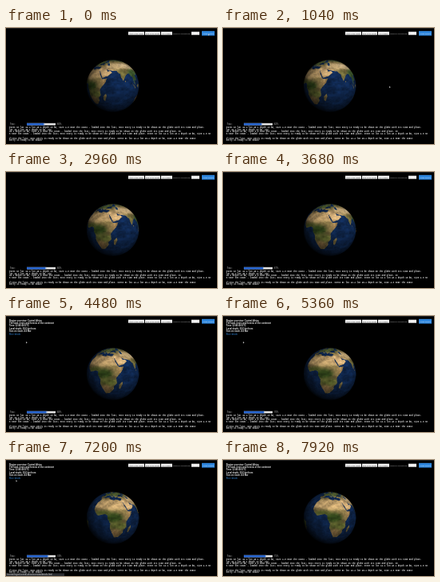
An HTML page with a canvas that plays this animation: 264x146 px, repeating every 8 s.

```html
<!DOCTYPE html>
<html lang="en">
<head>
<meta charset="utf-8">
<title>Rotating globe</title>
<style>
html, body { margin: 0; width: 100%; height: 100%; overflow: hidden; background: #000; }
canvas { display: block; width: 264px; height: 146px; }
</style>
</head>
<body>
<canvas id="stage" width="264" height="146"></canvas>
<script>
const LOOP = 8000, STEP = 80;
const MAP_W = 720, MAP_H = 360;
const GLOBE = { x: 133.5, y: 73, radius: 33, distance: 3, size: 132 };
const SANS = '"Liberation Sans", Arial, sans-serif';
const MONO = '"Liberation Mono", monospace';
const stage = document.getElementById('stage');
const ctx = stage.getContext('2d');

// Coastlines as "longitude,latitude" points.
const coasts = {
  africa: '-17,15 -16,21 -13,28 -9,31 -6,36 3,37 10,37 11,34 15,32 20,31 22,33 30,31 33,31 35,27 37,21 40,15 43,11 51,12 48,5 42,-2 39,-6 40,-15 35,-20 35,-25 32,-29 27,-34 19,-35 17,-29 14,-22 12,-16 13,-9 9,-1 9,4 5,6 -2,5 -8,4 -13,9',
  madagascar: '49,-12 50,-16 47,-25 44,-24 44,-17',
  arabia: '33,31 35,28 39,21 43,13 52,16 59,22 56,25 51,24 48,31 36,37',
  asia: '27,37 36,36 36,31 48,30 52,27 57,26 62,25 67,25 70,21 73,20 74,14 77,8 80,13 82,17 87,21 91,22 94,17 98,16 99,9 103,1 103,6 100,13 105,9 109,12 106,20 113,22 121,28 119,35 125,40 135,45 140,60 150,70 100,76 70,72 45,67 39,47 41,41 28,41',
  europe: '-9,37 -9,43 -2,43 -2,48 3,51 8,54 12,54 20,54 24,59 30,60 38,65 46,67 50,48 38,47 30,46 28,41 23,37 20,40 14,45 13,43 18,40 16,38 10,44 4,43 0,39 -5,36',
  scandinavia: '5,58 5,62 14,68 25,71 40,67 30,60 22,60 24,65 17,61 16,56 12,56 10,59',
  britain: '-5,50 1,51 -2,56 -5,58',
  ceylon: '80,9 82,7 80,6',
  sumatra: '95,5 105,-6 104,-2',
  borneo: '109,1 117,6 116,-4',
  australia: '114,-22 122,-18 131,-12 136,-12 140,-17 142,-11 153,-27 147,-38 130,-32 116,-35',
  brazil: '-50,0 -35,-6 -39,-17 -48,-26 -58,-38 -70,-38 -70,5'
};
const caspian = '50,37 54,37 53,45 47,45';

// Vegetation patches: longitude, latitude, half width, half height, colour.
const biomes = [
  [12, 23, 34, 10, '#bd9d6a'], [46, 24, 16, 11, '#b8986a'], [66, 37, 22, 9, '#a58d64'],
  [95, 40, 24, 8, '#b09a74'], [18, 0, 15, 8, '#34491c'], [0, 8, 14, 4, '#4d5826'],
  [26, -13, 15, 7, '#59602c'], [21, -25, 8, 7, '#927448'], [47, 6, 7, 7, '#96784c'],
  [15, 50, 36, 9, '#4c5a30'], [80, 62, 60, 9, '#424f31'], [78, 20, 9, 9, '#6d6638'],
  [105, 18, 18, 15, '#38502a'], [133, -24, 17, 10, '#a26e43'], [-55, -8, 18, 12, '#3c5224']
];

function hash(x, y) {
  const n = Math.sin(x * 127.1 + y * 311.7) * 43758.5453;
  return n - Math.floor(n);
}

function noise(x, y) {
  const ix = Math.floor(x), iy = Math.floor(y);
  const ease = f => f * f * (3 - 2 * f);
  const mix = (a, b, f) => a + (b - a) * f;
  const fx = ease(x - ix), fy = ease(y - iy);
  return mix(mix(hash(ix, iy), hash(ix + 1, iy), fx),
             mix(hash(ix, iy + 1), hash(ix + 1, iy + 1), fx), fy);
}

function makeCanvas(width, height) {
  const canvas = document.createElement('canvas');
  canvas.width = width;
  canvas.height = height;
  return canvas.getContext('2d', { willReadFrequently: true });
}

function tracePath(points) {
  const path = new Path2D();
  for (const point of points.split(' ')) {
    const [lon, lat] = point.split(',').map(Number);
    path.lineTo((lon + 180) * 2, (90 - lat) * 2);
  }
  path.closePath();
  return path;
}

function buildMap() {
  const map = makeCanvas(MAP_W, MAP_H);
  map.fillStyle = '#10284f';
  map.fillRect(0, 0, MAP_W, MAP_H);
  const land = new Path2D();
  Object.values(coasts).forEach(points => land.addPath(tracePath(points)));
  map.fillStyle = '#7b6b41';
  map.fill(land);
  map.save();
  map.clip(land);
  map.filter = 'blur(5px)';
  for (const [lon, lat, w, h, color] of biomes) {
    map.fillStyle = color;
    map.beginPath();
    map.ellipse((lon + 180) * 2, (90 - lat) * 2, w * 2, h * 2, 0, 0, Math.PI * 2);
    map.fill();
  }
  map.restore();
  map.fillStyle = '#142e52';
  map.fill(tracePath(caspian));

  const image = map.getImageData(0, 0, MAP_W, MAP_H), data = image.data;
  for (let y = 0, i = 0; y < MAP_H; y++) {
    for (let x = 0; x < MAP_W; x++, i += 4) {
      const grain = 0.6 * noise(x / 16, y / 10) + 0.4 * noise(x / 5, y / 4);
      const gain = 0.68 + grain * 0.64;
      for (let c = 0; c < 3; c++) data[i + c] *= gain;
    }
  }
  return data;
}

// Each visible pixel keeps its map row, longitude from the centre, light and edge coverage.
function projectGlobe() {
  const { distance: d, size } = GLOBE, pixels = [];
  const k = 1 / Math.sqrt(d * d - 1);
  for (let py = 0; py < size; py++) {
    for (let px = 0; px < size; px++) {
      const u = (px + 0.5) * 2 / size - 1, v = 1 - (py + 0.5) * 2 / size;
      const r2 = u * u + v * v;
      if (r2 >= 1) continue;
      const a = 1 + k * k * r2;
      const t = (d - Math.sqrt(Math.max(0, d * d - a * (d * d - 1)))) / a;
      const x = u * k * t, y = v * k * t, z = d - t;
      const diffuse = Math.max(0, x * 0.28 + y * 0.36 + z * 0.89);
      pixels.push({
        index: (py * size + px) * 4,
        row: Math.floor((90 - Math.asin(y) * 180 / Math.PI) * 2),
        lon: Math.atan2(x, z) * 180 / Math.PI,
        light: 0.06 + 1.02 * diffuse ** 1.25,
        alpha: Math.min(1, (1 - Math.sqrt(r2)) * size / 2) * 255
      });
    }
  }
  return pixels;
}

const mapData = buildMap();
const globePixels = projectGlobe();
const globe = makeCanvas(GLOBE.size, GLOBE.size);
const globeImage = globe.createImageData(GLOBE.size, GLOBE.size);

function drawGlobe(t) {
  const centre = 60 - t * 0.006, out = globeImage.data;
  for (const p of globePixels) {
    const column = Math.floor((p.lon + centre + 540) % 360 * 2);
    const source = (p.row * MAP_W + column) * 4;
    for (let c = 0; c < 3; c++) out[p.index + c] = mapData[source + c] * p.light;
    out[p.index + 3] = p.alpha;
  }
  globe.putImageData(globeImage, 0, 0);
  const { x, y, radius } = GLOBE;
  ctx.drawImage(globe.canvas, x - radius, y - radius, radius * 2, radius * 2);
}

function box(x, y, w, h, color) {
  ctx.fillStyle = color;
  ctx.fillRect(x, y, w, h);
}

function label(text, x, y, color = '#fff', font = '2.6px ' + SANS) {
  ctx.font = font;
  ctx.fillStyle = color;
  ctx.fillText(text, x, y);
}

function drawToolbar() {
  const fields = [[153, 20, 'Start of the range'], [174, 19, 'End of the range'], [194, 14, 'Any region'], [232, 10, '']];
  for (const [x, width, text] of fields) {
    box(x, 4.7, width, 4, '#f4f4f4');
    label(text, x + 1, 7.6, '#333', '2.3px ' + SANS);
  }
  label('Minimum magnitude', 208.7, 7.6, '#aaa', '2.4px ' + SANS);
  box(245, 3.8, 16, 5.8, '#2f86dc');
  label('Show events', 246.3, 7.6, '#e5f1ff', '2.4px ' + SANS);
}

function drawSlider(t) {
  const end = 47.5 + 5.5 * t / LOOP;
  label('Time:', 5, 122.2, '#bbb');
  box(26, 119.8, 36, 2.6, '#e4e4e4');
  box(26, 119.8, end - 26, 2.6, '#2463cf');
  box(end, 119.8, 1, 2.6, '#99b5df');
  label(String(Math.round(60 + 15 * t / LOOP)) + '%', 64, 122.2, '#bbb');
}

const words = 'event at lat 12.4 lon 48.1 depth 10 km, size 4.6 near the coast - loaded into the list; next entry is ready to be shown on the globe with its time and place. ';
const logLines = [[125.8, 158, 0], [128.5, 34, 9], [131.2, 138, 22], [134, 162, 47], [139.6, 150, 71], [142.3, 26, 93]];

function drawLog() {
  for (const [y, length, offset] of logLines) {
    label(words.repeat(3).slice(offset, offset + length), 4, y, '#ddd', 'bold 2.6px ' + MONO);
  }
}

const details = ['Region overview: Central Africa', 'The land, rivers and forests of the continent', 'Time: 12:40:06 UTC', 'Local depth: 10.0 km from', 'Size on scale: 4.6 Mw'];

function drawDetails(t) {
  if (t < 4400) return;
  details.forEach((text, i) => label(text, 4, 6.7 + i * 3.35, '#eee', 'bold 2.7px ' + SANS));
  const hover = t >= 5840 && t < 7200;
  label('More details', 4, 23.7, hover ? '#55a4ef' : '#2d7dcb', '2.6px ' + SANS);
  if (hover) box(4, 24, 14, 0.3, '#55a4ef');
}

function drawStatus(t) {
  if (t < 5840 || t >= 7600) return;
  box(0, 142.6, 73, 3.4, '#2b2d31');
  label('/events/region/central-africa/overview/details.html', 1, 145.2, '#ccc', '2.6px ' + SANS);
}

// Pointer stops: time, x, y.
const pointerRuns = [
  [[0, 253, 7], [480, 253, 7], [960, 208, 73], [2560, 208, 73]],
  [[4480, 25, 32], [5440, 25, 32], [5840, 11, 23], [7120, 11, 23], [7280, 14, 27]]
];

function drawPointer(t) {
  const run = pointerRuns.find(stops => t >= stops[0][0] && t < stops.at(-1)[0]);
  if (!run) return;
  const next = run.findIndex(stop => stop[0] > t);
  const [from, to] = [run[next - 1], run[next]];
  const f = (t - from[0]) / (to[0] - from[0]), ease = f * f * (3 - 2 * f);
  const x = from[1] + (to[1] - from[1]) * ease, y = from[2] + (to[2] - from[2]) * ease;
  ctx.fillStyle = '#bbb';
  ctx.beginPath();
  ctx.moveTo(x, y);
  ctx.lineTo(x, y + 2.4);
  ctx.lineTo(x + 1.7, y + 1.7);
  ctx.fill();
}

function draw(now) {
  const t = Math.floor(now % LOOP / STEP) * STEP;
  box(0, 0, 264, 146, '#000');
  box(0, 0, 264, 0.6, '#333');
  drawGlobe(t);
  drawToolbar();
  drawSlider(t);
  drawLog();
  drawDetails(t);
  drawStatus(t);
  drawPointer(t);
}

const start = performance.now();
function tick() {
  draw(performance.now() - start);
  requestAnimationFrame(tick);
}
tick();
</script>
</body>
</html>
```
